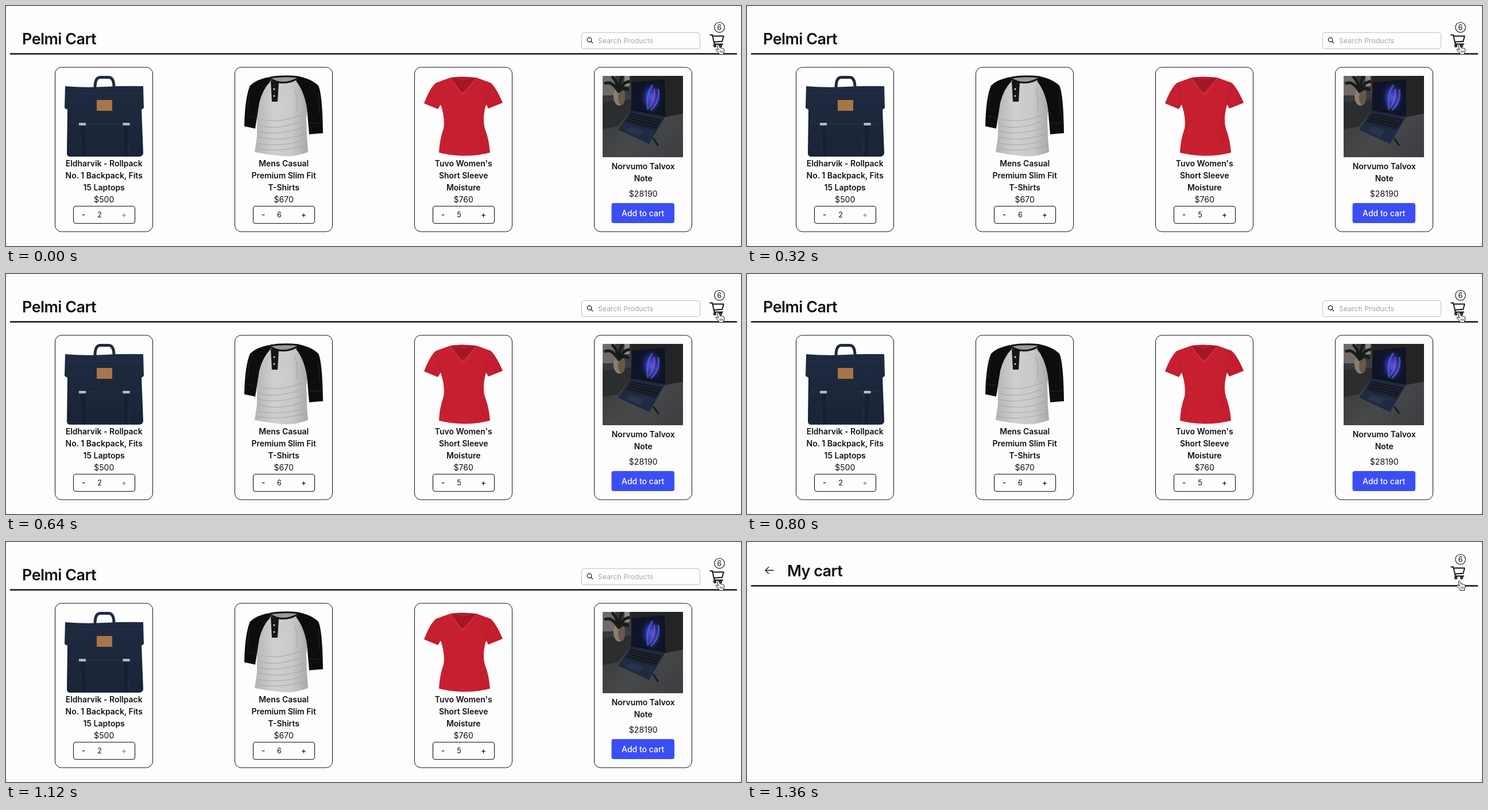
An HTML page for the animation above (2800 ms loop, 1280x419 px).

```html
<!DOCTYPE html>
<html lang="en">
<head>
<meta charset="utf-8">
<title>Shop</title>
<style>
html, body { margin: 0; width: 100%; height: 100%; overflow: hidden; background: #fdfdfd; }
svg { display: block; width: 1280px; height: 419px; font-family: Inter, "Liberation Sans", sans-serif; fill: #111; }
.line { fill: none; stroke: #111; }
.title { font-size: 27px; font-weight: 600; letter-spacing: -.55px; }
.name { font-size: 13.95px; font-weight: 600; text-anchor: middle; }
.price { font-size: 14.1px; text-anchor: middle; }
.qty { font-size: 12.6px; text-anchor: middle; }
.step { font-size: 13.4px; font-weight: 500; text-anchor: middle; }
.hint { font-size: 12.3px; fill: #a5a8ab; }
.button { font-size: 14px; font-weight: 500; fill: #fff; text-anchor: middle; }
#shop { animation: shop 2800ms step-end infinite; }
#cart { animation: cart 2800ms step-end infinite; }
#top { animation: lift 2800ms step-end infinite; }
@keyframes shop { 0% { visibility: visible; } 48.57%, 100% { visibility: hidden; } }
@keyframes cart { 0% { visibility: hidden; } 48.57%, 100% { visibility: visible; } }
@keyframes lift { 0% { transform: translateY(0); } 48.57%, 100% { transform: translateY(-7px); } }
</style>
</head>
<body>
<svg viewBox="0 0 1280 419">
  <defs>
    <linearGradient id="navy" x2="0" y2="1">
      <stop offset="0" stop-color="#1f2a40"/><stop offset="1" stop-color="#1a2438"/>
    </linearGradient>
    <linearGradient id="grey">
      <stop offset="0" stop-color="#b4b4b6"/><stop offset=".35" stop-color="#cfcfd0"/>
      <stop offset=".7" stop-color="#c9c9ca"/><stop offset="1" stop-color="#a8a8aa"/>
    </linearGradient>
    <linearGradient id="red">
      <stop offset="0" stop-color="#c41f30"/><stop offset=".5" stop-color="#c92031"/>
      <stop offset="1" stop-color="#c11d2e"/>
    </linearGradient>
    <linearGradient id="desk" x2="1" y2="1">
      <stop offset="0" stop-color="#323335"/><stop offset=".6" stop-color="#47484a"/>
      <stop offset="1" stop-color="#3c3d40"/>
    </linearGradient>
    <radialGradient id="glow">
      <stop offset="0" stop-color="#5a58d0"/><stop offset=".5" stop-color="#2c309a"/>
      <stop offset="1" stop-color="#101532" stop-opacity="0"/>
    </radialGradient>
    <clipPath id="photo"><path d="M1039 122h140v142h-140z"/></clipPath>
    <clipPath id="screen"><path d="M1092 136L1145 130 1146 190 1090 180z"/></clipPath>
  </defs>

  <g id="top">
    <path class="line" stroke-width="2.7" d="M7 83.5H1273"/>
    <circle class="line" cx="1242.5" cy="37.3" r="8.8" stroke-width="1.1"/>
    <text class="qty" x="1242.5" y="42">6</text>
    <g class="line" stroke-width="1.9" stroke-linejoin="round">
      <path d="M1225.5 50.5H1230L1233.6 66.5H1249M1230.4 52.500H1249.7L1247.3 61.8L1232.6 62.800"/>
      <circle cx="1234.5" cy="69.5" r="1.7"/><circle cx="1244.5" cy="69.5" r="1.7"/>
    </g>
  </g>

  <g id="cart">
    <path class="line" stroke-width="1.3" d="M46.5 49.5H32M38 43.5L32 49.5 38 55.5"/>
    <text class="title" x="70" y="60">My cart</text>
  </g>

  <g id="shop">
    <text class="title" x="28" y="67">Pelmi Cart</text>
    <rect x="1002.5" y="46.5" width="206" height="28" rx="3.5" fill="#fdfdfd" stroke="#bfc2c4"/>
    <g class="line" stroke-width="1.2"><circle cx="1016" cy="59" r="3.7"/><path d="M1018.7 61.7L1022 65"/></g>
    <text class="hint" x="1031" y="65.2">Search Products</text>
    <g id="cards"></g>

    <g id="bag">
      <path fill="none" stroke="#1f2a40" stroke-width="5" d="M155 142Q155 125 164 124.500H179Q188 125 188 142"/>
      <path fill="url(#navy)" d="M103 140Q137 143 171 141T239 140L240 178 236 181 239 257Q238 263 231 263H112Q106 263 106 257L107 181 102 178z"/>
      <path fill="none" stroke="#28344b" d="M104 151Q170 154 239 151M109 205Q171 207 235 205"/>
      <path fill="none" stroke="#141c2d" d="M109 181L108 257M235 181L237 257M126 236H216"/>
      <path fill="#172035" d="M128 207H139L141 262H131zM204 207H215L213 262H203z"/>
      <path fill="none" stroke="#29354d" stroke-width=".8" d="M128 207L131 262M139 207L141 262M204 207L203 262M215 207L213 262"/>
      <path fill="#b9bbbc" d="M127 204h12v4.5h-12zM203.500 204h12v4.5h-12z"/>
      <rect x="158" y="164" width="27" height="19" fill="#a77549"/>
    </g>

    <g id="raglan">
      <path fill="url(#grey)" d="M458 127Q484 139 511 126L523 145 526 170 523 195 524 230 526 255Q503 264 480 262T433 255L437 228 437 195 440 164z"/>
      <path fill="none" stroke="#9b9b9e" stroke-width="1.2" opacity=".7" d="M440 208Q470 218 512 202M438 218Q468 228 518 212M438 228Q478 239 520 223M438 239Q470 247 515 236M437 249Q474 256 524 243M445 198Q480 205 514 190M503 145Q510 165 506 184"/>
      <path fill="#0c0d0e" d="M458 124Q436 128 425 139 416 160 415 210L434 214 441 169Q447 145 461 131zM511 123Q533 128 544 139 551 153 552 222L528 224 524 178Q519 148 505 131z"/>
      <path fill="none" stroke="#26272a" d="M417 192L436 195M527 203Q539 207 551 203M424 150L421 181M544 153L546 189"/>
      <path fill="#98999b" d="M461 124Q483 120 509 124L501 133Q480 137 465 132z"/>
      <path fill="none" stroke="#111213" stroke-width="3" d="M457 125Q482 143 512 124M460 125Q482 121 510 124"/>
      <path fill="#151617" d="M461 130L475 134 473 167H463z"/>
      <g fill="#d8d8d8"><circle cx="467" cy="145" r="1.5"/><circle cx="467" cy="157" r="1.5"/></g>
    </g>

    <g id="tee">
      <path fill="url(#red)" d="M774 125Q796 122 819 125L844 134Q854 143 865 169L840 179 836 172Q829 197 834 214 841 232 843 256 799 267 754 256 755 233 762 214 765 196 757 172L752 180 728 170Q738 143 749 134z"/>
      <path fill="#a21827" d="M775 126Q796 122 818 126L798 149Q795 151 792 149z"/>
      <path fill="#b71d2d" d="M780 126Q796 124 813 126L796 130z"/>
      <path fill="none" stroke="#d93543" stroke-width="1.2" d="M774 126L792 151Q796 155 800 151L819 126"/>
      <path fill="none" stroke="#a91929" opacity=".6" d="M751 139L757 173M843 139L836 173M771 199Q764 216 763 247M826 198Q824 224 833 249M731 167L754 177M840 176L862 167"/>
    </g>

    <g clip-path="url(#photo)">
      <path fill="url(#desk)" d="M1039 122h140v142h-140z"/>
      <path fill="#6e6b69" d="M1039 122h22v34h-22z"/>
      <path fill="#8a8785" d="M1077 122h9v18h-9z"/>
      <path fill="#232426" d="M1088 122h91v66l-32 6-57-18z"/>
      <path fill="#2c2d2f" d="M1039 168L1088 163V182L1066 210 1039 215z"/>
      <ellipse cx="1068" cy="158" rx="10" ry="16" fill="#8d7d6d"/>
      <ellipse cx="1072" cy="160" rx="6" ry="13" fill="#65584d"/>
      <path fill="none" stroke="#171c18" stroke-width="5" d="M1068 151Q1054 128 1042 136M1068 150Q1063 129 1055 123M1067 151Q1068 130 1074 122M1068 150Q1075 131 1087 132M1068 148Q1080 140 1084 148"/>
      <path fill="#111318" d="M1090 134L1147 128 1148 194 1088 183z"/>
      <g clip-path="url(#screen)">
        <path fill="#10142a" d="M1088 128h62v63h-62z"/>
        <ellipse cx="1124" cy="160" rx="20" ry="29" fill="url(#glow)"/>
        <path fill="none" stroke="#5874ef" stroke-width="3" opacity=".6" d="M1118 181Q1114 153 1126 138M1123 182Q1140 166 1136 145"/>
        <path fill="none" stroke="#a768d1" stroke-width="2" opacity=".6" d="M1120 178Q1131 163 1129 145"/>
      </g>
      <path fill="#202a40" d="M1088 182L1148 193 1120 241 1066 216z"/>
      <path fill="#141821" d="M1088 187L1142 198 1131 216 1078 203z"/>
      <path fill="none" stroke="#3c4556" stroke-width=".8" stroke-dasharray="2.500 1" d="M1086 190L1138 201M1084 194L1136 205M1082 198L1133 210M1080 202L1131 214"/>
      <path fill="#2a354c" d="M1088 211L1112 218 1103 228 1080 218z"/>
      <path fill="none" stroke="#434b5e" d="M1066 217L1120 242 1148 195"/>
      <path fill="none" stroke="#17181a" stroke-width="3" d="M1127 231L1136 244"/>
    </g>
  </g>

  <g fill="#fff" stroke="#111" stroke-linejoin="round">
    <path d="M1239.200 69Q1240.500 66.500 1242.200 69L1243.700 73.500Q1245 72 1246 73.800 1247.500 72.700 1248.300 74.500 1250.300 73.900 1250.800 76L1250.600 79.500 1249.400 82V84.500H1241.700V82.800L1236.300 76.700Q1236 74.500 1238.200 75.200L1240.500 77z"/>
    <path fill="none" stroke-width=".8" d="M1243.500 78V81.500M1245.700 78V81.500M1247.900 78V81.500"/>
  </g>
</svg>
<script>
const items = [
  { lines: ["Eldharvik - Rollpack", "No. 1 Backpack, Fits", "15 Laptops"], price: "$500", qty: 2, full: true },
  { lines: ["Mens Casual", "Premium Slim Fit", "T-Shirts"], price: "$670", qty: 6 },
  { lines: ["Tuvo Women's", "Short Sleeve", "Moisture"], price: "$760", qty: 5 },
  { lines: ["Norvumo Talvox", "Note"], price: "$28190" }
];

const text = (kind, x, y, words, extra = "") =>
  `<text class="${kind}" x="${x}" y="${y}" ${extra}>${words}</text>`;
const box = (x, y, w, h, r, extra) =>
  `<rect x="${x}" y="${y}" width="${w}" height="${h}" rx="${r}" ${extra}/>`;

function card(item, i) {
  const left = 85.5 + 313 * i, mid = left + 85.2;
  const first = item.qty ? 279.6 : 285.2;
  const names = item.lines.map((words, n) => text("name", mid, first + 21.2 * n, words));
  const price = text("price", mid, item.qty ? 343.4 : 332.8, item.price);
  const control = item.qty
    ? box(left + 32, 349.5, 107, 30, 4, 'class="line" stroke-width="1.1"') +
      text("step", left + 49.5, 369.2, "-") +
      text("qty", left + 77.5, 369, item.qty) +
      text("step", left + 120, 369.2, "+", item.full ? 'fill="#888"' : "")
    : box(1054.5, 344, 109.5, 35, 4, 'fill="#3b4ef5"') + text("button", 1109.2, 367, "Add to cart");
  return box(left, 107, 170, 287, 11, 'fill="#fdfdfd" stroke="#111"') + names.join("") + price + control;
}

document.getElementById("cards").innerHTML = items.map(card).join("");
</script>
</body>
</html>
```
